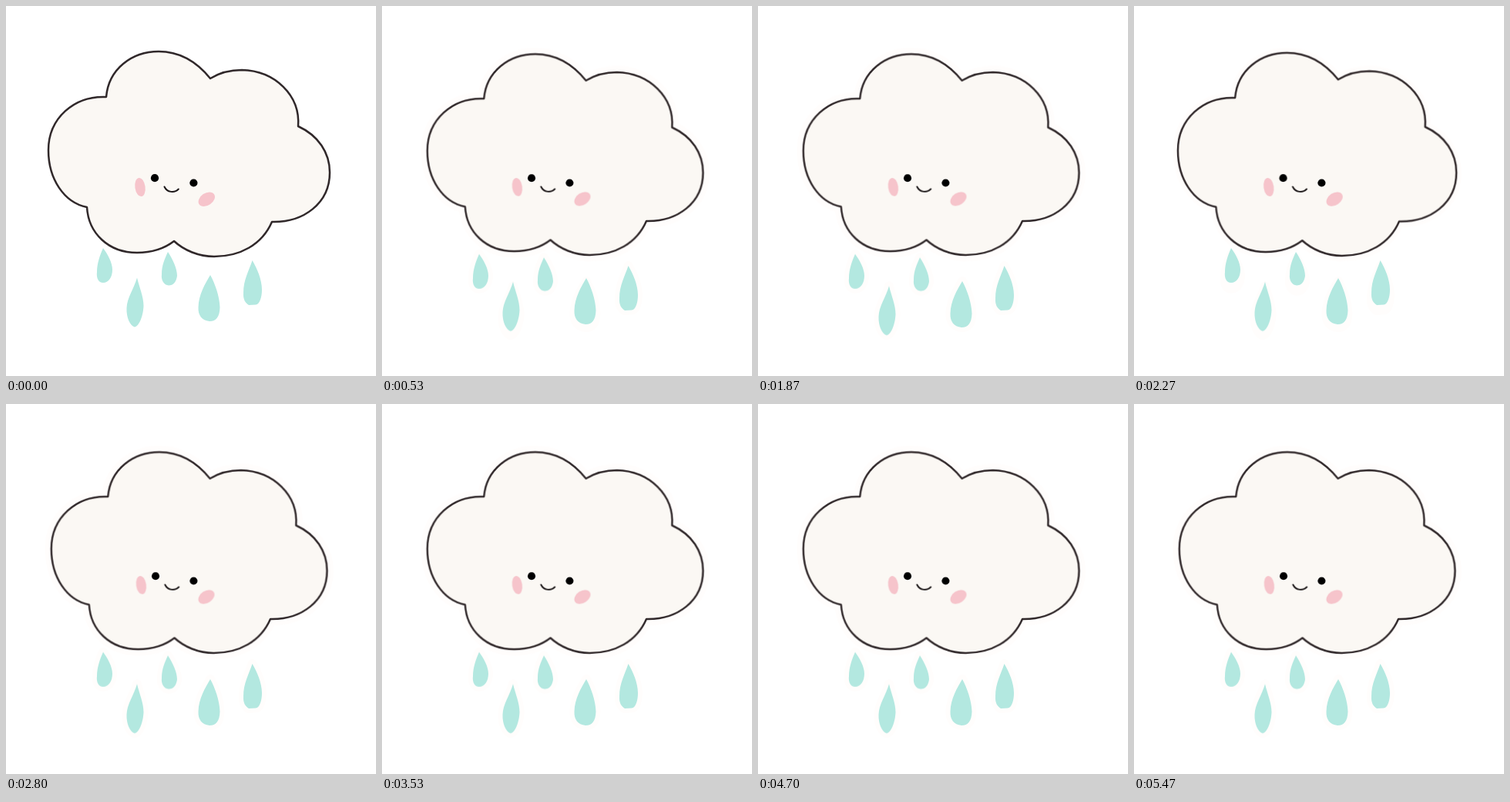
Recreate the animation shown at these times as an HTML page. Size 480 px wide and 480 px high, loop 5.66 s.

```html
<!DOCTYPE html>
<html lang="en">
<head>
<meta charset="utf-8">
<title>Rain cloud</title>
<style>
  html, body { margin: 0; width: 100%; height: 100%; overflow: hidden; background: #fff; }
  svg { display: block; width: 100vw; height: 100vh; }
  #cloud, #halo-cloud { transform-origin: 243px 228px; }
  #halo-cloud { transform: scale(.98); }
  #halo { fill: none; stroke: #fffdfc; stroke-width: 17; stroke-linejoin: round; }
  #drops { fill: #b3e8e0; }
  #outline { fill: #fbf8f4; stroke: #30282a; stroke-width: 2.5; stroke-linejoin: round; }
</style>
</head>
<body>
<svg viewBox="0 0 480 480">
  <defs>
    <path id="shape" d="M130 118C133 82 163 59 198 59C225 59 248 73 265 94
      C278 86 291 83 306 83C349 84 382 116 379 156
      C405 168 420 190 420 216C420 256 386 281 345 280
      C332 310 303 325 270 325C250 325 231 317 218 305
      C205 315 189 320 170 320C133 320 107 295 105 261
      C75 255 55 224 55 187C55 146 88 116 130 118Z"/>
  </defs>
  <g id="halo"><use id="halo-cloud" href="#shape"/></g>
  <g id="drops"></g>
  <g id="cloud">
    <use id="outline" href="#shape"/>
    <ellipse cx="174" cy="235" rx="6.6" ry="12.2" fill="#f6c4cb" transform="rotate(-8 174 235)"/>
    <ellipse cx="260.3" cy="250.7" rx="11.7" ry="8" fill="#f6c4cb" transform="rotate(-34 260.3 250.7)"/>
    <circle cx="193" cy="223.2" r="5.1"/>
    <circle cx="243.4" cy="229.5" r="5.1"/>
    <path d="M205.5 234.5C209 242 218.500 243 223.800 237.500" fill="none" stroke="#1c1718" stroke-width="2" stroke-linecap="round"/>
  </g>
</svg>
<script>
const LOOP = 5660;
// Start of each pulse and the moment the cloud settles.
const beats = [[0, 500], [970, 1470], [1930, 2430], [2870, 3330], [3800, 4300], [4770, 5270]];

// lead: the drop moves before the cloud does; fall: distance to the lowest pose.
const drops = [
  { d: 'M126 314C132 322 138 333 138 342C138 352 133 359 126 359C120 359 117 353 118 345C118 334 122 323 126 314Z', fall: 7.8 },
  { d: 'M170 352.500C173 365 178.500 377 178.500 389C178 402 173 415 167 416.500C161 415 156 404 156.500 392C157 378 166 367 170 352.500Z', fall: 10.7, lead: true },
  { d: 'M210 319C216 328 222 340 222 350C221 358 217 362.500 211 362.500C205 362 201 356 202 348C202 336 206 328 210 319Z', fall: 7.3 },
  { d: 'M265 349C271 360 277 376 277.500 391C277 403 273 409 264 409C254 408 249 401 249.500 391C250 374 258 361 265 349Z', fall: 8, lead: true },
  { d: 'M319.500 330C326 341 332 355 332 368C332 378 329 387 324 387.500L315 388C310 385 307.500 380 308 372C308 355 315 344 319.500 330Z', fall: 7 },
];

function play(el, poses) {
  const frames = poses.map(([time, style]) => ({ offset: time / LOOP, easing: 'step-end', ...style }));
  frames.push({ ...frames.at(-1), offset: 1 });
  el.animate(frames, { duration: LOOP, iterations: Infinity });
}

function addPath(parent, d) {
  const path = document.createElementNS('http://www.w3.org/2000/svg', 'path');
  path.setAttribute('d', d);
  parent.append(path);
  return path;
}

const byId = id => document.getElementById(id);
const scale = s => ({ transform: `scale(${s})` });
const shift = y => ({ transform: `translateY(${y}px)` });

play(byId('cloud'), beats.flatMap(([start, low]) =>
  [[start, scale(1)], [start + 230, scale(.99)], [low, scale(.98)]]));

for (const { d, fall, lead } of drops) {
  const halo = addPath(byId('halo'), d);
  halo.style.transform = shift(fall).transform;
  halo.style.strokeWidth = 12;
  play(addPath(byId('drops'), d), beats.flatMap(([start, low]) => [
    [start, shift(0)],
    [start + (lead ? 130 : 360), shift(fall / 2)],
    [low + (lead ? 35 : 0), shift(fall)],
  ]));
}

play(byId('halo'), [[0, { opacity: 0 }], [130, { opacity: 1 }]]);
</script>
</body>
</html>
```
